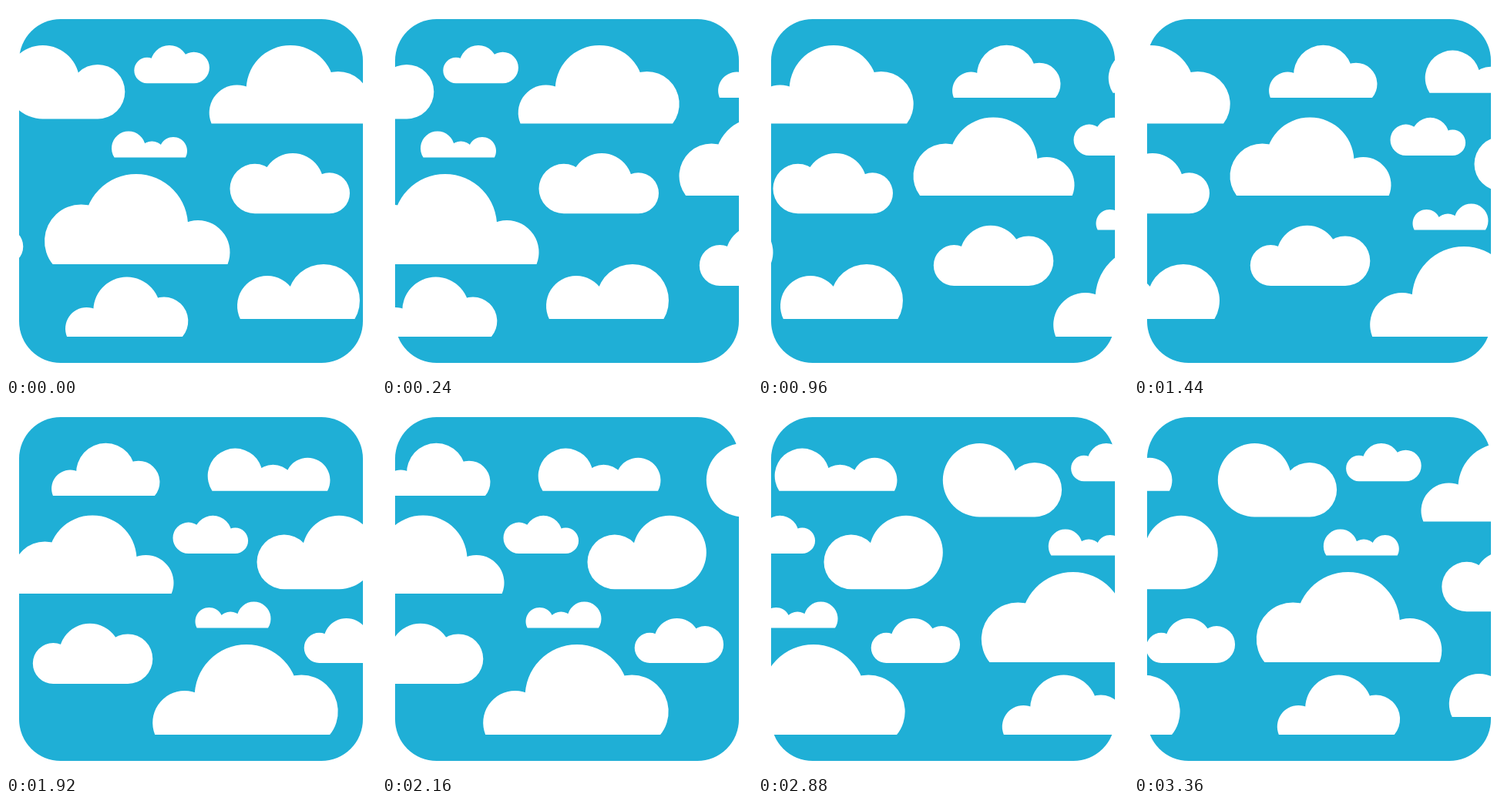
An HTML page that plays this animation: 480 by 480 pixels, repeating every 3.6 s.

```html
<!DOCTYPE html>
<html lang="en">
<head>
<meta charset="utf-8">
<title>Drifting clouds</title>
<style>
  html, body { margin: 0; width: 100%; height: 100%; overflow: hidden; background: #fff; }
  svg { display: block; width: 100%; height: 100%; }
</style>
</head>
<body>
<svg viewBox="0 0 480 480">
  <rect x="17" y="17" width="446" height="446" rx="54" fill="#1fafd6"/>
  <g id="sky" fill="#fff"></g>
</svg>
<script>
const STEP = 240;
const SPAN = 943.8;   // length of the looping strip
const MARGIN = 260;   // room for a cloud to leave on the left

// Strip position during each step; the drift is slightly uneven.
const drift = [0, 87, 153, 212, 271, 309, 348, 405, 464, 523, 583, 643, 704, 766, 835];

// A circle resting on, or cut off by, the base line y = 0.
function puff(x, rise, r) {
  if (rise >= r) {
    return `M${x - r} ${-rise}a${r} ${r} 0 1 1 ${2 * r} 0a${r} ${r} 0 1 1 ${-2 * r} 0Z`;
  }
  const half = Math.sqrt(r * r - rise * rise);
  return `M${x - half} 0A${r} ${r} 0 1 1 ${x + half} 0Z`;
}

// Puffs run left to right as [x, rise, r]; rise is the centre's height above the base.
function shape(...puffs) {
  const [end, , endR] = puffs[puffs.length - 1];
  const spine = puffs.map(([x, rise]) => `L${x} ${-rise}`).join("");
  const body = `M${puffs[0][0]} 0${spine}L${end} 0Z`;
  return { d: body + puffs.map(p => puff(...p)).join(""), width: end + endR };
}

const round = (x, r) => [x, r, r];

const pair = shape(round(47.7, 47.7), round(119, 35.3));
const hump = shape([39, 17, 39], [112, 24, 47]);
const small = shape(round(16.7, 16.7), [45.7, 24.7, 24.5], round(77.4, 20.2));
const low = shape([22, 12, 22], [52.3, 3, 18], [80, 8.5, 18]);
const oval = shape(round(32.3, 32.3), [81.5, 38.3, 40], round(129, 26.5));
const large = shape([47.5, 30, 47.5], [118.8, 49.7, 67.3], [199, 15.5, 41.5]);
const wide = shape([36, 14, 36], [105.3, 44.3, 57.3], [167, 25.5, 42]);
const dome = shape([27.5, 10.5, 27.5], [79.8, 34, 43.5], [128, 20.2, 31.3]);

const sky = document.getElementById("sky");
const clouds = [];

// x is the left edge on the strip; a negative scale mirrors the cloud.
function place({ d, width }, x, base, scale = 1) {
  const el = document.createElementNS("http://www.w3.org/2000/svg", "path");
  el.setAttribute("d", d);
  sky.append(el);
  const shift = scale < 0 ? -scale * width : 0;
  clouds.push({ el, x, base, scale, shift });
}

place(pair, 0, 146.5);
place(pair, 789.5, 240.2, -1);
place(hump, 300, 406);
place(small, 166.3, 100.2);
place(small, 680.5, 194, -1);
place(low, 137, 196.5);
place(low, 709.5, 290.5, -1);
place(low, 725.7, 112.7, 1.62);
place(oval, 290.5, 269.3);
place(oval, 498.8, 363, -1);
place(oval, 850.7, 336, -0.742);
place(large, 50, 335);
place(large, 654.2, 429, -1);
place(wide, 263.7, 152.5);
place(wide, 472.5, 246, -1);
place(dome, 77, 429);
place(dome, 523.1, 119, 0.881);

const mod = (a, n) => ((a % n) + n) % n;

function render(ms) {
  const pos = drift[Math.floor(ms / STEP) % drift.length];
  for (const { el, x, base, scale, shift } of clouds) {
    const left = mod(x - pos + MARGIN, SPAN) - MARGIN;
    el.setAttribute("transform",
      `translate(${left + shift} ${base}) scale(${scale} ${Math.abs(scale)})`);
  }
}

const start = performance.now();
function tick() {
  render(performance.now() - start);
  requestAnimationFrame(tick);
}
tick();
</script>
</body>
</html>
```
